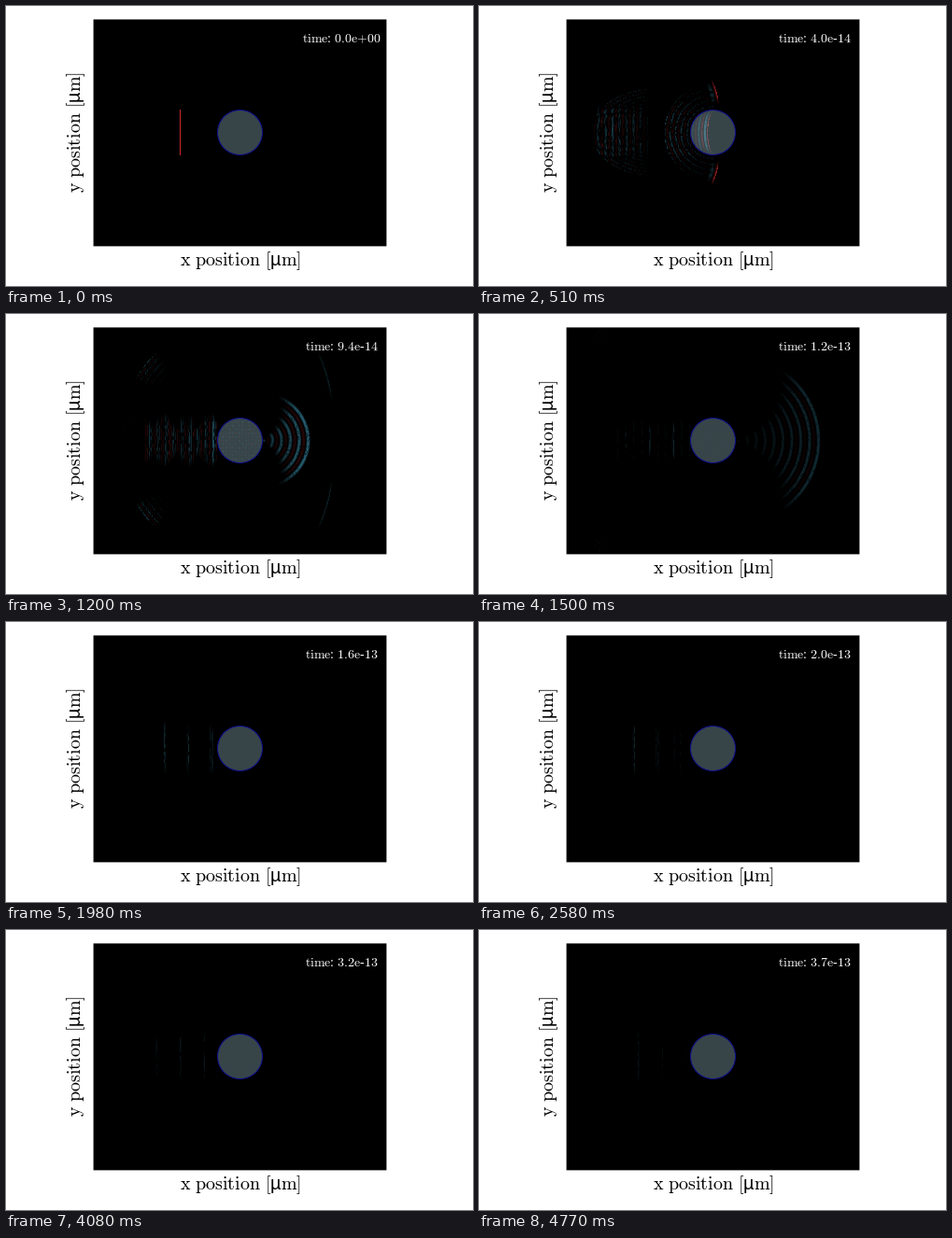
Animation, 500 px wide and 300 px high, one loop 4.8 s. Source, as a matplotlib script:

```python
import numpy as np
import matplotlib.pyplot as plt
from matplotlib.animation import FuncAnimation
from matplotlib.patches import Circle, Rectangle

W, H, DPI = 500, 300, 100
FRAMES, INTERVAL = 160, 30
SPEED = 4.0                      # pixels per frame outside the ball
LEFT, RIGHT, TOP, BOTTOM = 94, 407, 15, 257
SRC_X, MID_Y, HALF = 186, 135.5, 24.5
BALL_X, BALL_R = 250.5, 24.0
DT = 2.35e-15

CYAN = np.array([70, 175, 210]) / 255
RED = np.array([205, 42, 45]) / 255

plt.rcParams["mathtext.fontset"] = "cm"

X, Y = np.meshgrid(np.arange(LEFT, RIGHT) + 0.5, np.arange(TOP, BOTTOM) + 0.5)
DX, DY = X - SRC_X - 0.5, Y - MID_Y
ADY = np.abs(DY)

rng = np.random.default_rng(4)


def grain(run):
    """Random values that repeat over short vertical runs."""
    rows, cols = X.shape
    return np.repeat(rng.random((rows // run + 1, cols)), run, axis=0)[:rows]


DASH = np.where(grain(2) < 0.45, 0.25, 1.0)
LONG_DASH = np.where(grain(4) < 0.4, 0.3, 1.0)
SOFT = np.where(grain(2) < 0.15, 0.6, 1.0)


def wave(s, length, decay, phase=0.0):
    """Wave train at distance s behind its front."""
    s_pos = np.maximum(s, 0)
    swing = np.cos(2 * np.pi * s_pos / length - phase)
    return np.where(s > 0, np.exp(-s_pos / decay) * swing, 0)


def window(v, width, power=4):
    return np.exp(-np.abs(v / width) ** power)


def damp_red(v, k):
    return np.where(v < 0, k * v, v)


# Fixed geometry of each wave family
BALL_D = np.hypot(X - BALL_X, DY)
IN_BALL = BALL_D < BALL_R
BALL_ANGLE = np.arctan2(ADY, BALL_X - X)
BEAM = window(DY, 27, 6)
OVAL = np.hypot(DX, 1.42 * DY)
ABSORB = 1 / (1 + np.exp(-(X - 124) / 2))
FOCUS_X = 274
FOCUS_D = np.hypot(X - FOCUS_X, DY)
FOCUS_ANGLE = np.arctan2(ADY, X - FOCUS_X)
EDGE_D = np.hypot(DX, ADY - HALF)
EDGE_ANGLE = np.arctan2(ADY - HALF, DX)
ENTRY_X = BALL_X - np.sqrt(np.maximum(BALL_R ** 2 - DY ** 2, 0))
ARRIVAL = 10 + (ENTRY_X - 226.5) / SPEED + (X - ENTRY_X) * 1.5 / SPEED
GAP = (X > 148) & (X < 226) & ~IN_BALL
GAP_SHAPE = window(DY, 14 + 13 * np.abs(np.cos(X * 0.13)), 6)


def outgoing(n):
    r = SPEED * n
    amp = 0.8 * np.exp(-n / 28)
    depth = np.maximum(r - 2 + DX, 0)
    left = BEAM * wave(r - 2 + DX, 7.5, 60) * (1 - 0.8 * np.exp(-depth / 10)) * LONG_DASH
    ring = 0.5 * wave(r - 2 - OVAL, 5.5, 24) * window(DY, 52, 8) * DASH
    right = BEAM * wave(r - DX, 7.5, 18) * LONG_DASH
    left = damp_red(left + ring, 0.65) * ABSORB
    if n > 4:
        left = left * np.clip(-DX / 12, 0, 1)
    return amp * np.where(DX <= 0, left,
                          np.where(X < ENTRY_X, right * (X < 228), 0))


def reflected(n):
    if n < 10:
        return 0
    r = BALL_R + SPEED * (n - 10)
    near = 0.65 * np.exp(-(n - 10) / 12) * wave(r - BALL_D, 6, 40) * window(DY, 47, 8)
    near = near * (0.45 + 0.55 * BEAM)
    rear = 0
    if n > 20:
        rear = (0.5 * np.exp(-abs(n - 36) / 10) * wave(r - 14 - BALL_D, 6, 14)
                * window(BALL_ANGLE - 0.67, 0.13))
    v = damp_red(near + rear, 0.6)
    return np.where((X < 252) & ~IN_BALL, v * DASH * ABSORB, 0)


def inside(n):
    if n < 10:
        return 0
    fade = np.exp(-max(n - 24, 0) / 5)
    pulse = 0.7 * fade * wave(SPEED * (n - ARRIVAL), 10, 16, np.pi) * window(DY, 20)
    speckle = 0
    if n > 20:
        level = 0.25 * min(1, (n - 20) / 10) * np.exp(-max(n - 34, 0) / 10)
        speckle = level * np.sin(0.9 * X + 0.7 * n) * np.cos(0.8 * DY) * DASH
    return np.where(IN_BALL, pulse * SOFT + speckle, 0)


def transmitted(n):
    if n < 28:
        return 0
    s = SPEED * (n - 27.4) - FOCUS_D + 1.5
    amp = 0.75 * np.exp(-max(n - 36, 0) / 14)
    spread = 0.95 + 0.5 * np.exp(-(n - 28) / 8)
    spread = spread * np.exp(-np.maximum(s, 0) / 90)
    v = amp * wave(s, 9.5, 70, np.pi / 2)
    v = v * window(FOCUS_ANGLE, spread, 6) * window(DY, 76, 10)
    v = damp_red(v, 0.4) * np.clip((396 - X) / 25, 0, 1)
    return np.where((X > FOCUS_X) & ~IN_BALL, v * SOFT, 0)


def edge_wings(n):
    s = 4.06 * n + 1.5 - EDGE_D
    tone = np.clip((n - 28) / 10, -1, 0.5)
    amp = 0.75 * np.exp(-max(n - 17, 0) / 40) * min(1, n / 10)
    v = amp * tone * wave(s, 12, 4) * window(EDGE_ANGLE - 0.28, 0.15)
    return np.where((ADY > HALF) & (X < 370), v * SOFT, 0)


def lingering(n):
    if n < 18:
        return 0
    amp = 0.3 * min(1, (n - 18) / 12) * np.exp(-max(n - 30, 0) / 45) + 0.09
    amp *= 0.8 + 0.2 * np.cos(2 * np.pi * (n - 86) / 24)
    drift = 3.877 * (n - 86)
    packet = np.maximum(0, np.cos(2 * np.pi * (X - 165 + drift) / 24)) ** 2
    early = np.exp(-max(n - 40, 0) / 15)
    packet = packet * (1 - 0.7 * early) + 0.6 * early
    near_ball = 1 + 0.6 * early * np.exp(-(226 - X) / 15)
    carrier = np.cos(2 * np.pi * (X + SPEED * n) / 8.5) + 0.5 * np.cos(2.2 * X + n)
    carrier = damp_red(carrier, 0.7 * early)
    return np.where(GAP, amp * packet * near_ball * carrier * GAP_SHAPE * LONG_DASH, 0)


def source_line(n):
    line = (np.abs(DX) < 0.5) & (ADY < HALF)
    return -np.exp(-n / 2) * line


def field_rgb(n):
    v = source_line(n)
    if n:
        for part in (outgoing, reflected, inside, transmitted, edge_wings, lingering):
            v = v + part(n)
    a = np.clip((np.abs(v) - 0.03) / 0.97, 0, 1)[..., None]
    return np.where(v[..., None] > 0, CYAN, RED) * a


def time_label(n):
    mantissa, power = f"{n * DT:.1e}".split("e")
    sign = "-" if power[0] == "-" else "${+}$"
    return rf"$\mathrm{{time}}$:$\mathrm{{\ {mantissa}e}}${sign}$\mathrm{{{power[1:]}}}$"


def axis_label(name):
    return rf"$\mathrm{{{name}\ position\ [}}$µ$\mathrm{{m]}}$"


fig = plt.figure(figsize=(W / DPI, H / DPI), dpi=DPI, facecolor="white")
ax = fig.add_axes([0, 0, 1, 1])
ax.axis("off")
image = ax.imshow(field_rgb(0), extent=(LEFT, RIGHT, BOTTOM, TOP),
                  interpolation="nearest", aspect="auto")
ax.set_xlim(0, W)
ax.set_ylim(H, 0)
ax.add_patch(Rectangle((93.6, 14.4), 313.8, 243, facecolor="black", lw=0,
                       snap=False, zorder=-1))

ball = (BALL_X, MID_Y)
ax.add_patch(Circle(ball, BALL_R, facecolor="lightblue", alpha=0.32, lw=0))
ax.add_patch(Circle(ball, BALL_R, fill=False, edgecolor=(0.06, 0.06, 0.55), lw=0.75))

label_style = dict(ha="center", va="baseline", fontsize=14.4, family="Liberation Sans")
ax.text(250.5, 278.5, axis_label("x"), **label_style)
ax.text(80.5, 135.5, axis_label("y"), rotation=90, rotation_mode="anchor", **label_style)
clock = ax.text(359.5, 38.8, time_label(0), color="white", ha="center", va="baseline",
                fontsize=10, family="Liberation Serif")


def draw(n):
    image.set_data(field_rgb(n))
    clock.set_text(time_label(n))
    return image, clock


anim = FuncAnimation(fig, draw, frames=FRAMES, interval=INTERVAL,
                     repeat=True, repeat_delay=0, blit=False)
plt.show()
```
